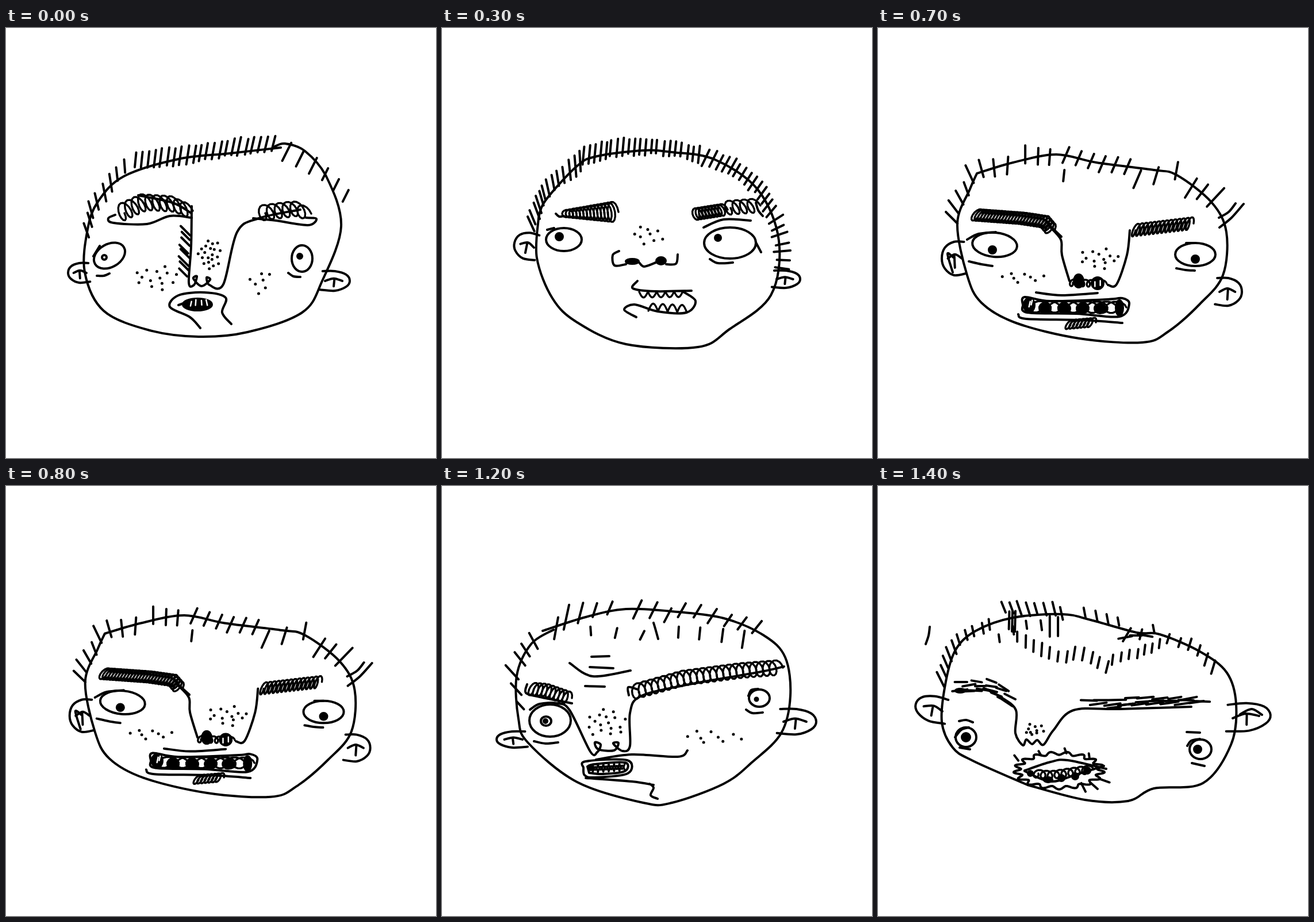
An HTML page for the animation above (1.5 s loop, 748 by 748 pixels).

```html
<!DOCTYPE html>
<html lang="en">
<head>
<meta charset="utf-8">
<title>Doodle faces</title>
<style>
html, body { margin: 0; width: 100%; height: 100%; overflow: hidden; background: #fff; }
svg { display: block; width: 100vw; height: 100vh; }
g { fill: none; stroke: #000; stroke-width: 4; stroke-linecap: round; stroke-linejoin: round; }
path, ellipse { vector-effect: non-scaling-stroke; }
.ink { fill: #000; }
.gap { stroke: #fff; stroke-width: 2.5; }
.tooth { fill: #fff; stroke-width: 3; }
.fat { stroke-width: 5; }
.thin { stroke-width: 3.4; }
</style>
</head>
<body>
<svg id="stage" viewBox="0 0 748 748"></svg>
<script>
let seed = 7;
const random = () => (seed = seed * 16807 % 2147483647) / 2147483647;
const jitter = r => (random() * 2 - 1) * r;
const path = (d, cls = '') => `<path class="${cls}" d="${d}"/>`;
const points = s => s.trim().match(/\S+\s+\S+/g).map(p => p.split(/\s+/).map(Number));
const mix = (a, b, u) => a + (b - a) * u;

// Place at share u of a polyline's length
function along(p, u) {
  const len = p.slice(1).map((q, i) => Math.hypot(q[0] - p[i][0], q[1] - p[i][1]));
  let d = u * len.reduce((a, b) => a + b), i = 0;
  while (i < len.length - 1 && d > len[i]) d -= len[i++];
  return [0, 1].map(k => mix(p[i][k], p[i + 1][k], d / len[i]));
}

// Smooth curves through a few points
function smooth(s) {
  const p = points(s);
  let d = 'M' + p[0];
  for (let i = 0; i < p.length - 1; i++) {
    const a = p[i - 1] || p[i], b = p[i], c = p[i + 1], e = p[i + 2] || c;
    const h = k => [b[k] + (c[k] - a[k]) / 6, c[k] - (e[k] - b[k]) / 6];
    const [x1, x2] = h(0), [y1, y2] = h(1);
    d += `C${x1} ${y1} ${x2} ${y2} ${c}`;
  }
  return d;
}
const line = (...parts) => path(parts.map(smooth).join(''));
const blob = (s, cls = 'ink') => path(smooth(s) + 'Z', cls);
const oval = (x, y, rx, ry, cls = '', turn = 0) =>
  `<ellipse class="${cls}" cx="${x}" cy="${y}" rx="${rx}" ry="${ry}" transform="rotate(${turn} ${x} ${y})"/>`;
const dot = (x, y, r) => oval(x, y, r, r, 'ink');

// n short strokes along a polyline, leaning from one direction to another
function hair(s, n, dx, dy, dx2 = dx, dy2 = dy, cls = '') {
  const p = points(s);
  let d = '';
  for (let k = 0; k < n; k++) {
    const u = n > 1 ? k / (n - 1) : 0, [x, y] = along(p, u), size = 1 + jitter(.15);
    const hx = mix(dx, dx2, u) * size / 2, hy = mix(dy, dy2, u) * size / 2;
    const cx = x + jitter(1.5), cy = y + jitter(1.5);
    d += `M${cx - hx} ${cy - hy}L${cx + hx} ${cy + hy}`;
  }
  return path(d, cls);
}

// Freckles scattered evenly in an ellipse
function spots(x, y, rx, ry, n) {
  let d = '';
  for (let k = 0; k < n; k++) {
    const a = k * 2.4, r = Math.sqrt((k + .5) / n);
    d += `M${x + rx * r * Math.cos(a) + jitter(2)} ${y + ry * r * Math.sin(a) + jitter(2)}h.01`;
  }
  return path(d, 'fat');
}

// Pen loops along a polyline
function coil(s, n, rx, ry, tilt = 0, ryEnd = ry) {
  const p = points(s), steps = n * 14;
  let d = '';
  for (let k = 0; k <= steps; k++) {
    const u = k / steps, [x, y] = along(p, u), a = u * n * 2 * Math.PI;
    const v = Math.sin(a) * mix(ry, ryEnd, u);
    d += (k ? 'L' : 'M') + (x + rx * Math.cos(a) + tilt * v) + ' ' + (y + v);
  }
  return path(d, 'thin');
}

// Row of scallops hanging down (h > 0) or standing up (h < 0)
function teeth(x, y, x2, y2, n, h) {
  let d = '';
  for (let k = 0; k <= n * 8; k++) {
    const u = k / n / 8;
    d += (k ? 'L' : 'M') + mix(x, x2, u) + ' ' + (mix(y, y2, u) + h * Math.abs(Math.sin(k * Math.PI / 8)));
  }
  return path(d, 'thin');
}

function wavy(x, y, rx, ry, amp, n) {
  let d = '';
  for (let k = 0; k <= 180; k++) {
    const a = k / 90 * Math.PI, r = 1 + amp * Math.sin(n * a);
    d += (k ? 'L' : 'M') + (x + rx * r * Math.cos(a)) + ' ' + (y + ry * r * Math.sin(a));
  }
  return path(d);
}

// Half oval with a small hook inside; side is -1 left, 1 right
function ear(x, y, rx, ry, side, turn = 0) {
  const at = (u, v) => `${x + side * rx * u} ${y + ry * v}`;
  const d = smooth([at(-.1, -1), at(.4, -1), at(.85, -.65), at(1, 0), at(.85, .6), at(.4, 1), at(-.2, .9)].join(' '))
    + smooth([at(0, 0), at(.35, -.25), at(.7, 0)].join(' ')) + `M${at(.38, -.2)}L${at(.35, .55)}`;
  return `<g transform="rotate(${turn} ${x} ${y})">${path(d)}</g>`;
}

const faces = [];
const face = (step, x, y, x2, y2, ...parts) =>
  faces.push({ step, box: [x, y, x2, y2], art: parts.join('') });

face(0, 106, 187, 600, 538,
  line(`478 208 390 218 300 228 205 258 160 302 142 350 137 425 170 492 250 526 335 537 420 529 515 495
    550 440 583 345 558 260 520 214 485 201 466 207`),
  hair('224 230 300 223 390 208 464 201', 22, -3, 30, -7, 28),
  hair('488 215 540 242 575 272 592 291', 6, -14, 28, -9, 18),
  hair('140 353 149 314 182 269 206 241', 8, 10, 28, 2, 27),
  ear(140, 426, 32, 17, -1), ear(555, 440, 43, 17, 1),
  line('323 330 285 327 245 341 187 339 178 331 190 325', '230 291 290 304 322 322'),
  coil('198 322 240 303 290 306 317 318', 10, 8, 14, .35),
  line(`323 310 322 380 318 443 327 447 332 432 326 436 340 449 355 438 349 434 354 447
    378 446 402 355 440 331 512 316`),
  hair('312 352 309 425', 8, 15, 15),
  line('430 331 470 335 525 343 540 332 522 330'),
  coil('442 322 505 314 522 323', 6, 9, 13, .3),
  oval(180, 396, 29, 20, '', -30), oval(515, 401, 18, 23), oval(171, 399, 4, 4), dot(511, 397, 4),
  line('152 397 163 379', '158 431 170 431 180 427', '491 426 500 432 512 433'),
  line('338 522 320 503 285 485 300 465 345 460 382 469 376 495 392 515', '300 482 314 477'),
  oval(333, 481, 25, 10, 'ink'), hair('321 479 348 479', 4, -2, 9, 2, 9, 'gap'),
  spots(354, 393, 21, 26, 20), spots(260, 435, 40, 23, 14), spots(443, 440, 22, 24, 7));

face(3, 124, 190, 625, 558,
  line(`168 330 180 300 235 240 270 223 350 213 400 216 475 229 550 282 586 370 572 465 500 524 445 555
    320 550 235 512 192 470 165 400 168 330`),
  hair('154 341 180 280 240 232', 13, 11, 24, 2, 34),
  hair('246 222 300 208 374 206', 14, -3, 32, -2, 24),
  hair('385 209 405 208 448 221', 7, -3, 28),
  hair('460 225 505 240 552 278 572 318', 14, -13, 27, -15, 18),
  hair('582 332 590 367 594 405 592 418', 7, 22, -14, 27, 4),
  ear(160, 382, 35, 23, -1, 15), ear(582, 437, 41, 15, 1),
  line('198 323 204 328 212 327', '546 304 550 317 558 327'),
  coil('214 323 299 320', 14, 8, 6, .1, 18),
  coil('440 324 490 316', 9, 7, 10, .3), coil('494 313 546 309', 4, 8, 12, .4),
  oval(212, 368, 31, 20), oval(204, 363, 6, 6, 'ink'), oval(501, 374, 45, 27), dot(480, 365, 5),
  line('183 351 195 348', '455 347 490 333 537 335', '546 373 555 390', '466 402 480 409 506 408'),
  line('308 388 297 395 300 413 320 411', '343 408 352 415 372 408', '390 411 407 410 410 394'),
  oval(331, 406, 11, 4, 'ink'), oval(381, 405, 8, 6, 'ink'),
  line('340 440 332 453 370 458 434 457', '420 459 441 475 425 495 375 493 335 481 317 490 338 503'),
  teeth(343, 459, 419, 458, 5, 10), teeth(359, 492, 426, 495, 4, -13),
  spots(356, 360, 30, 18, 9));

face(5, 119, 211, 629, 536,
  line(`223 238 295 231 425 243 510 268 570 303 609 355 607 455 565 500 490 530 400 533 295 522 235 487
    180 430 163 385 172 320 187 262 223 239`),
  hair('219 239 231 238', 2, 8, -2, 8, -2, 'fat'),
  hair('188 252 202 249', 2, 10, 25), hair('250 229 294 230', 3, -4, 22, -3, 32),
  hair('340 232 379 240 425 252', 3, -3, 28, -5, 36), hair('457 248 477 247', 2, -7, 22),
  hair('524 264 549 267', 2, -18, 20), hair('168 297 162 320', 2, 13, 20, 11, 8),
  ear(160, 388, 42, 35, -1, -20), ear(608, 424, 20, 25, 1),
  coil('210 308 270 310 300 314 331 325', 15, 5, 12, -.4),
  line('205 318 300 325 344 358 350 400 365 405', '462 322 446 330 450 380 438 396 412 394 410 402', '545 288 578 301'),
  coil('470 324 510 304 556 296', 11, 6, 10, -.4),
  oval(360, 410, 10, 5, 'ink'), oval(382, 404, 7, 9, 'ink'), oval(400, 411, 17, 5, 'ink'), oval(417, 405, 6, 10, 'ink'),
  spots(402, 364, 25, 23, 15),
  oval(215, 356, 38, 29), oval(214, 354, 20, 14), oval(212, 354, 8, 7, 'ink'),
  oval(538, 356, 35, 22), oval(531, 355, 11, 9), dot(532, 355, 4),
  line('177 343 190 334', '179 382 195 390 215 391', '194 403 220 407', '276 403 298 392',
    '500 383 510 391 530 398', '549 395 570 390', '538 409 552 409'),
  blob('372 463 410 463 440 444 465 460 452 472 405 482 372 468'),
  oval(397, 454, 15, 7, 'tooth'), oval(423, 452, 12, 7, 'tooth', -20), hair('444 463 455 461', 2, 4, 9, 4, 9, 'gap'),
  line('353 470 366 430 400 427 430 424 463 445 466 457', '353 471 365 468 381 428',
    '378 449 405 448', '368 481 395 505 440 510 464 462', '391 495 393 508 420 522', '376 527 400 534 427 528'),
  coil('413 511 444 509', 7, 5, 6));

face(7, 110, 200, 637, 549,
  line(`172 253 235 234 310 220 380 234 480 247 520 256 580 303 606 355 600 430 560 480 505 528 460 547
    350 540 240 513 180 478 155 430 138 340 160 280 172 253`),
  hair('160 255 178 243 208 243 225 239', 4, 13, 28, -2, 30),
  hair('257 221 271 221 299 225', 3, 0, 35, -2, 26),
  hair('328 222 385 235 434 242', 6, -12, 28), hair('323 256 324 256', 1, -2, 19),
  hair('451 262 495 255 518 248', 3, -12, 28, -5, 28),
  hair('545 277 586 294', 3, -18, 29, -27, 29), hair('129 330 134 302 155 279', 4, 20, 20, 9, 24),
  line('593 330 610 320 622 305', '636 306 615 330 594 347', '131 399 121 393 130 425'),
  ear(146, 401, 35, 29, -1), ear(594, 459, 39, 24, 1),
  coil('169 325 250 331 290 337 301 350', 26, 7, 10, -.5),
  coil('444 352 545 340', 14, 4, 11, -.3),
  line('298 345 318 368 320 395 333 440', '300 345 319 363', '438 352 433 395 415 446 400 447'),
  oval(349, 440, 8, 11, 'ink'), oval(382, 444, 10, 10, 'ink'), coil('334 443 393 445', 6, 5, 6),
  hair('377 445 388 443', 2, 0, 8, 0, 8, 'gap'),
  spots(384, 401, 36, 19, 14), spots(253, 434, 50, 10, 8),
  oval(203, 377, 39, 21, '', 5), dot(199, 386, 6), oval(552, 394, 35, 20), dot(552, 402, 6),
  line('155 368 175 358 205 355', '158 406 180 411 199 414', '536 374 552 374', '519 418 535 421 551 422'),
  line('275 460 320 465 382 461', '252 482 255 468 300 475 400 472 425 470 437 480 420 502 345 497 260 495 252 482',
    '244 498 258 506 355 508 425 513'),
  oval(263, 482, 9, 12, 'ink'), oval(420, 487, 6, 13, 'ink'),
  [291, 325, 355, 386].map(x => oval(x, 488, 9, 8, 'ink')).join(''),
  coil('270 485 418 486', 9, 14, 10), hair('264 480 268 479', 2, -2, 9, -2, 9, 'gap'),
  coil('330 516 374 512', 7, 5, 8, -.5));

face(10, 109, 217, 639, 530,
  line(`536 256 585 308 610 360 600 430 560 469 505 507 440 527 390 527 310 514 230 490 180 462 167 445
    170 365 188 302 235 268 305 236 400 229 490 234 558 260`),
  hair('159 356 171 340', 2, 19, 16, 19, 20),
  hair('192 286 224 267 263 254 281 237', 7, 10, 15, 4, 19),
  hair('295 251 320 238 342 229', 4, 6, 16, 3, 16),
  hair('349 255 363 241 375 255 390 249 406 230', 5, 9, 16),
  hair('413 252 431 237 437 253 452 230 462 258 477 231 485 267 505 230 504 268 528 241 555 247', 11, 6, 16),
  hair('577 267 582 289 598 310', 3, -1, 18, -3, 21),
  hair('263 278 314 290 361 291 389 280', 7, -1, 17), hair('431 292 450 294 465 284 487 282 515 283 542 283', 6, 0, 14),
  hair('202 314 225 313 265 313 337 315 377 320', 9, 5, 18, -2, 24),
  hair('433 319 468 315 535 310', 7, -1, 23, -4, 12),
  ear(160, 427, 48, 22, -1), ear(593, 456, 44, 22, 1),
  coil('200 361 300 373 350 374 394 383', 30, 7, 9, -.4),
  coil('493 371 518 359 568 354', 13, 6, 8, .3), line('555 358 570 358 578 355', '175 367 230 369 290 378'),
  line(`398 385 408 410 412 464 425 468 438 455 427 449 440 463 463 455 464 433 456 440
    465 450 484 445 484 400 497 372`),
  oval(219, 413, 43, 29), oval(213, 416, 14, 13), dot(212, 416, 8),
  oval(564, 394, 31, 22), dot(562, 394, 7), coil('556 394 568 394', 2, 4, 9),
  line('172 397 185 394 200 385', '180 448 220 461 241 457', '532 379 551 380'),
  oval(453, 490, 10, 11, 'ink'), hair('458 483 459 483', 1, 3, -1, 3, -1, 'gap'),
  spots(442, 408, 18, 14, 7), spots(318, 460, 34, 30, 12), spots(531, 446, 30, 15, 10));

face(12, 94, 195, 652, 553,
  line(`175 252 250 228 320 214 410 219 490 230 560 260 597 298 606 365 590 430 540 480 490 518 400 551
    350 551 235 515 150 447 133 405 130 330 155 275 194 250`),
  hair('121 323 129 355 135 382', 3, 22, 24, 13, 14), hair('137 302 148 283 160 271', 3, 19, 24, 14, 26),
  hair('198 246 215 227 247 219 292 212', 5, -8, 44, -9, 22),
  hair('340 214 366 217 385 225 411 219 434 213 456 222 478 227 510 237 549 246', 9, -14, 30, -16, 20),
  hair('260 252 301 254 348 261', 3, 1, 14, -8, 16), hair('411 255 439 256 482 258 523 268', 4, -1, 17, -4, 26),
  ear(140, 441, 45, 14, -1), ear(594, 410, 57, 22, 1),
  line('368 238 371 248 376 266', '260 297 291 296', '222 308 262 331 328 321', '257 315 298 317', '249 348 283 349'),
  coil('154 353 180 355 220 369', 9, 6, 11, -.3),
  line('148 345 146 360 170 367 226 378', '325 364 324 350 341 354'),
  coil('334 358 420 334 520 321 584 316', 22, 9, 13, .1),
  line(`153 389 170 379 200 378 222 390 258 462 270 463 276 450 266 446 272 458 299 460 307 447 298 448
    314 461 327 452 327 395 345 366 420 347 550 324 595 314`),
  oval(188, 408, 36, 28), oval(181, 409, 9, 8), dot(180, 409, 3),
  oval(552, 369, 18, 15), dot(547, 371, 2.5),
  line('160 444 180 448 202 446', '529 389 540 395 558 394', '533 365 538 355 550 353'),
  line('268 476 330 467 410 471 427 460', '246 490 250 479 322 477 323 500 265 507 248 503 246 490',
    '250 508 330 514 368 520', '361 518 368 525 363 538 375 544'),
  blob('253 488 265 484 318 481 318 496 280 501 256 499', ''), dot(259, 490, 4),
  teeth(262, 485, 318, 483, 6, 9), teeth(262, 498, 318, 495, 6, -9),
  spots(284, 412, 38, 25, 17), spots(467, 436, 58, 13, 9));

face(14, 63, 196, 685, 551,
  line(`260 520 165 478 130 455 111 410 118 340 135 285 170 252 235 229 320 223 370 233 450 255 490 258
    560 288 607 325 623 380 614 450 565 517 480 526 435 548 360 546 260 520`),
  ear(112, 392, 48, 22, -1, 15), ear(617, 404, 66, 24, 1, -5),
  line('90 245 88 260 83 275', '630 397 650 388 668 398'),
  hair('108 336 120 300 140 265 195 241', 10, 12, 24, 2, 18),
  hair('217 212 241 213 306 213 318 221', 8, 8, 20, 5, 23), hair('228 235 240 234', 3, -1, 36),
  hair('298 244 313 244', 2, 0, 32), hair('360 220 418 236', 4, 3, 16),
  hair('434 258 455 259 479 250', 3, -12, 20, 3, 16), hair('506 267 556 280 582 316', 6, -5, 16, -6, 20),
  hair('430 262 465 260', 3, 22, -4, 22, 4),
  hair('243 262 262 275 320 300 347 290 363 293 398 316', 12, 0, 20, -5, 20),
  hair('409 301 423 297 450 292 490 275', 7, -2, 16), hair('211 264 255 241 283 241', 4, 2, 15),
  hair('145 341 195 338 220 350', 4, 22, 0, 15, 10), hair('142 356 195 354 226 378', 8, 25, -3, 18, 12),
  hair('158 348 205 348 230 366', 5, 22, -4, 20, 10), oval(143, 356, 8, 3, 'ink'),
  line('185 352 215 368 240 390 239 430 252 451 258 441 268 449 277 442 288 450 305 425 340 390 420 388 545 384'),
  hair('366 374 450 369 540 369', 8, 28, 1, 25, -5), hair('382 380 470 379 555 377', 8, 28, -4),
  hair('410 384 470 374 562 374', 7, 24, -3, 25, 1),
  oval(153, 437, 18, 17), dot(153, 437, 7), oval(561, 458, 19, 17), dot(556, 458, 6),
  line('141 409 153 407 165 411', '134 437 145 424 158 420', '142 455 160 458', '537 428 560 429',
    '538 452 545 443 560 440', '546 482 568 487'),
  wavy(315, 495, 73, 30, .09, 17),
  line('255 495 300 480 330 477 397 492', '255 496 300 514 345 502 393 487'),
  coil('272 500 300 503 368 493', 8, 7, 7),
  oval(296, 511, 7, 4, 'ink'), dot(265, 500, 4), dot(319, 508, 5), dot(343, 505, 5), dot(364, 495, 5),
  hair('241 474 309 458 348 467 367 469', 4, 6, 8, 1, 7), hair('394 512 380 521 358 523', 3, 17, 6, 8, 16),
  spots(272, 424, 17, 13, 10));

const stage = document.getElementById('stage');
stage.innerHTML = faces.map(f => `<g>${f.art}</g>`).join('');
const groups = [...stage.children];

// Steps between two poses fit the nearer face to a blended box
function draw(ms) {
  const step = Math.floor(ms % 1500 / 100);
  let i = faces.length - 1;
  while (faces[i].step > step) i--;
  const a = faces[i], b = faces[i + 1] || a;
  const u = a === b ? 0 : (step - a.step) / (b.step - a.step);
  const k = u < .5 ? i : i + 1, from = faces[k].box;
  const to = a.box.map((v, n) => mix(v, b.box[n], u));
  const sx = (to[2] - to[0]) / (from[2] - from[0]), sy = (to[3] - to[1]) / (from[3] - from[1]);
  groups.forEach((g, n) => { g.style.display = n === k ? '' : 'none'; });
  groups[k].setAttribute('transform', `matrix(${sx} 0 0 ${sy} ${to[0] - from[0] * sx} ${to[1] - from[1] * sy})`);
}

const start = performance.now();
function tick() {
  draw(performance.now() - start);
  requestAnimationFrame(tick);
}
tick();
</script>
</body>
</html>
```
